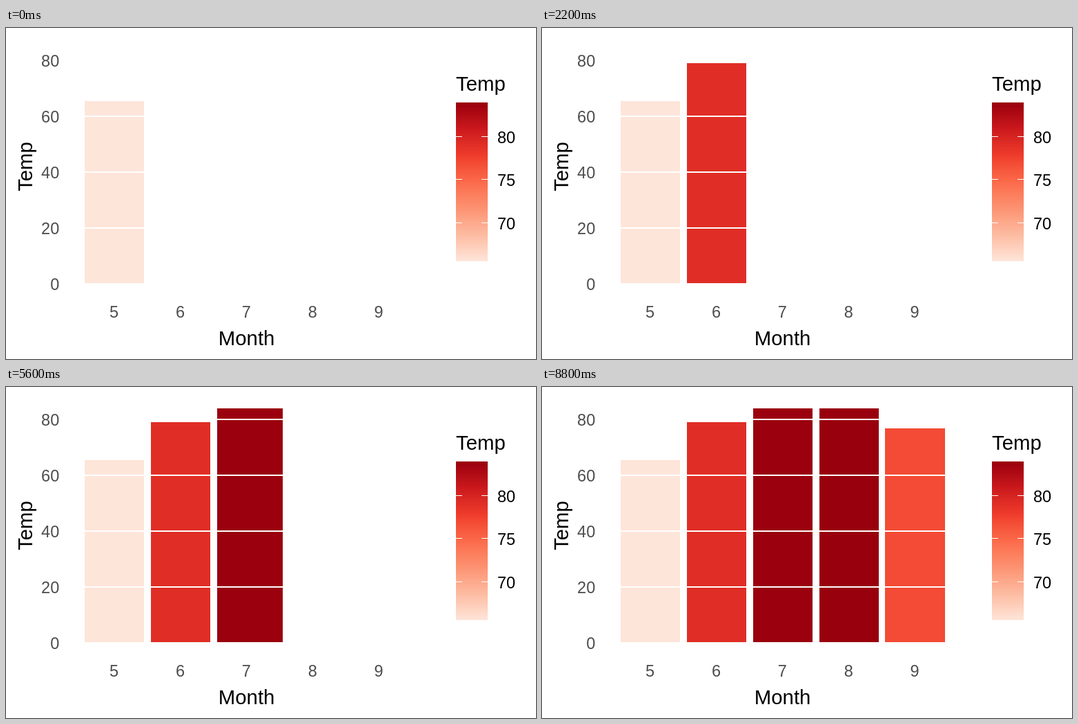
Recreate the animation shown at these times as an HTML page. Size 768 by 480 pixels, loop 10 s.

```html
<!DOCTYPE html>
<html lang="en">
<head>
<meta charset="utf-8">
<title>Mean temperature by month</title>
<style>
  html, body { margin: 0; height: 100%; overflow: hidden; background: #fff; }
  svg { display: block; width: 768px; height: 480px; font-family: "Liberation Sans", Arial, sans-serif; }
  .label { font-size: 23.47px; }
  .axis { fill: #4d4d4d; }
  .title { font-size: 29.33px; }
</style>
</head>
<body>
<svg id="chart" viewBox="0 0 768 480"></svg>
<script>
const chart = document.getElementById('chart');
const reds = ['#fee5d9', '#fcbba1', '#fc9272', '#fb6a4a', '#ef3b2c', '#cb181d', '#99000d'];
const temps = [65.548, 79.1, 83.903, 83.968, 76.9];
const low = temps[0], high = temps[3];
const barWidth = 86.28;

const lerp = (a, b, p) => a + (b - a) * p;
const mix = (a, b, p) => `color-mix(in lab, ${a}, ${b} ${(p * 100).toFixed(3)}%)`;
const monthX = i => 157.05 + 95.87 * i;
const tempY = v => 371 - 4.05 * v;
const legendY = v => 338 - 230 * (v - low) / (high - low);

function ramp(v) {
  const p = (v - low) / (high - low) * 6;
  const i = Math.min(5, Math.floor(p));
  return mix(reds[i], reds[i + 1], p - i);
}

function add(tag, attrs) {
  const el = document.createElementNS('http://www.w3.org/2000/svg', tag);
  for (const key in attrs) el.setAttribute(key, attrs[key]);
  return chart.appendChild(el);
}

function rect(x, y, width, height, fill) {
  const el = add('rect', { x, y, width, height });
  el.style.fill = fill;
  return el;
}

function text(str, x, y, cls, anchor = 'middle') {
  const el = add('text', { x, y, class: cls, 'text-anchor': anchor });
  el.textContent = str;
  return el;
}

const colors = temps.map(ramp);
const bars = temps.map(() => rect(0, 0, 0, 0, 'none'));

// Grid lines lie over the bars
for (let v = 0; v <= 80; v += 20) {
  rect(90, tempY(v) - 1, 517, 2, '#fff');
  text(v, 77.2, tempY(v) + 9, 'label axis', 'end');
}
temps.forEach((_, i) => text(i + 5, monthX(i) - 0.4, 420, 'label axis'));
text('Month', 348.6, 460, 'title');
text('Temp', 0, 0, 'title').setAttribute('transform', 'translate(38 201) rotate(-90)');

// Legend
text('Temp', 652, 91, 'title', 'start');
for (let y = 0; y < 230; y++) {
  rect(652, 108 + y, 46, 1, ramp(lerp(high, low, (y + 0.5) / 230)));
}
for (const v of [70, 75, 80]) {
  const y = legendY(v);
  for (const x of [652, 689]) rect(x, Math.floor(y - 0.3), 9, 1, '#fff');
  text(v, 712, Math.round(y + 9.3), 'label', 'start');
}

// Months travelled: 11 steps of 100 ms in every 2200 ms, after a hold
function position(t) {
  if (t < 1200) return 0;
  const u = t - 1200;
  const step = Math.min(11, Math.floor(u % 2200 / 100) + 1);
  return Math.floor(u / 2200) + step / 11;
}

function draw(t) {
  const pos = position(t);
  bars.forEach((bar, i) => {
    const shown = i === 0 || pos > i - 1;
    bar.style.display = shown ? '' : 'none';
    if (!shown) return;
    const from = Math.max(0, i - 1);
    const p = Math.min(1, pos - from);
    const mid = monthX(Math.min(i, pos));
    const left = Math.round(mid - barWidth / 2);
    const top = Math.round(tempY(lerp(temps[from], temps[i], p)));
    bar.setAttribute('x', left);
    bar.setAttribute('y', top);
    bar.setAttribute('width', Math.round(mid + barWidth / 2) - left);
    bar.setAttribute('height', 371 - top);
    bar.style.fill = mix(colors[from], colors[i], p);
  });
}

const start = performance.now();
function tick() {
  draw((performance.now() - start) % 10000);
  requestAnimationFrame(tick);
}
tick();
</script>
</body>
</html>
```
